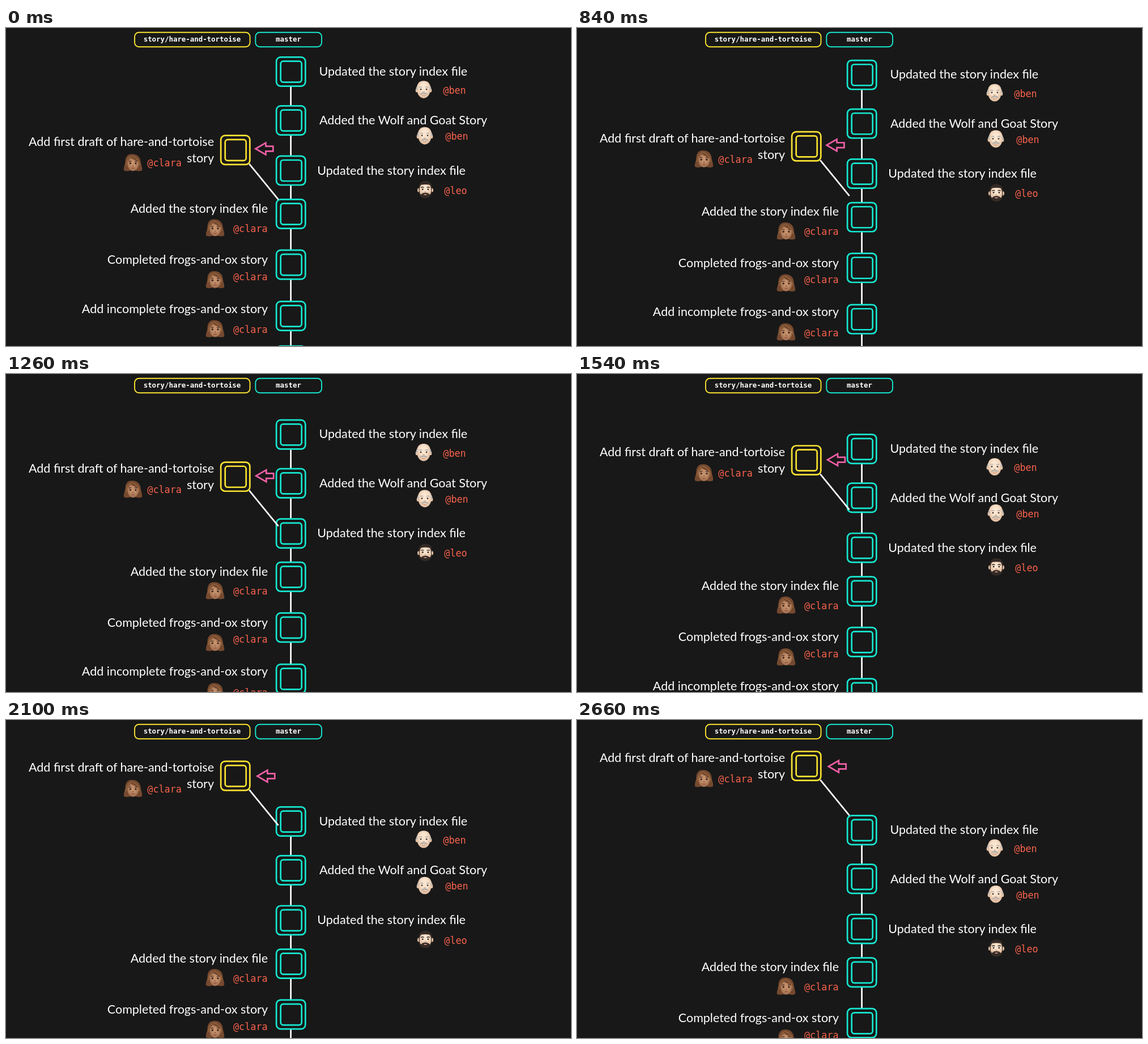
Write an HTML page that moves like this. It is 997 by 561 pixels and loops after 3080 ms.

```html
<!DOCTYPE html>
<html lang="en">
<head>
<meta charset="utf-8">
<title>Commit history</title>
<style>
  html, body { margin: 0; width: 100%; height: 100%; overflow: hidden; background: #181818; }
  svg { display: block; width: 997px; height: 561px; }
  .teal { stroke: #16e7cf; }
  .yellow { stroke: #fae232; }
  .box, .pill, .arrow, .link { fill: none; }
  .box { stroke-width: 2.7; }
  .pill { stroke-width: 1.9; }
  .arrow { stroke: #ef5fa7; stroke-width: 2.7; }
  .link { stroke: #fff; stroke-width: 2.7; }
  .msg { font: 21.5px Lato, sans-serif; fill: #fff; }
  .user { font: 16.8px "DejaVu Sans Mono", monospace; fill: #fa634d; }
  .branch { font: bold 12.4px "DejaVu Sans Mono", monospace; fill: #fff; text-anchor: middle; }
  .end { text-anchor: end; }
</style>
</head>
<body>
<svg viewBox="0 0 997 561">
  <defs>
    <g id="box">
      <rect x="1.4" y="1.4" width="51.2" height="51.2" rx="7.5"/>
      <rect x="9" y="8.6" width="37" height="37" rx="4.5"/>
    </g>

    <radialGradient id="pale" cy=".4">
      <stop offset=".5" stop-color="#fae5d0"/><stop offset="1" stop-color="#e6c3a6"/>
    </radialGradient>
    <radialGradient id="tan" cy=".45">
      <stop offset=".4" stop-color="#c4906b"/><stop offset="1" stop-color="#a37150"/>
    </radialGradient>

    <g id="elder">
      <ellipse cx="-12.3" cy="1.5" rx="2" ry="3.6" fill="#e6c3a6"/>
      <ellipse cx="12.3" cy="1.5" rx="2" ry="3.6" fill="#e6c3a6"/>
      <path d="M0-15.3C8-15.3 12-10 12-2C12 8 7 15.4 0 15.4S-12 8-12-2C-12-10-8-15.3 0-15.3Z" fill="url(#pale)"/>
      <path d="M-11-7Q-14.5-4-12.6 2L-10.6 0ZM11-7Q14.5-4 12.6 2L10.6 0Z" fill="#bcb9b4"/>
      <path d="M-8-3.6Q-5.5-5.4-2.8-3.8M8-3.6Q5.5-5.4 2.8-3.8" fill="none" stroke="#b0aca5" stroke-width="1.5"/>
      <circle cx="-5" cy="-.3" r="1.4" fill="#4b3a30"/>
      <circle cx="5" cy="-.3" r="1.4" fill="#4b3a30"/>
      <path d="M-2 3.6Q0 5 2 3.6" fill="none" stroke="#d0a486" stroke-width="1.4"/>
      <path d="M0 5.4Q4.6 5 7 8.8Q3 9 0 7.8Q-3 9-7 8.8Q-4.6 5 0 5.4Z" fill="#b3b0aa"/>
      <path d="M-3 10.2Q0 11.4 3 10.2" fill="none" stroke="#c58f78" stroke-width="1.1"/>
    </g>

    <g id="beard">
      <ellipse cx="-11.8" cy="1" rx="2.2" ry="3.6" fill="#e6c3a6"/>
      <ellipse cx="11.8" cy="1" rx="2.2" ry="3.6" fill="#e6c3a6"/>
      <path d="M-11.3 0C-13-10 -8-15.3 0-15.3S13-10 11.3 0V5C11 12 6 15.4 0 15.4S-11 12-11.3 5Z" fill="#332a26"/>
      <path d="M-10.3 2Q-10-7-7-8.4Q0-9.6 7-8.4Q10-7 10.3 2Q10 7.6 7.4 8.8Q4.6 5.6 0 5.6T-7.4 8.8Q-10 7.6-10.3 2Z" fill="url(#pale)"/>
      <path d="M-7.8-3.4Q-5-5-2.6-3.4M7.8-3.4Q5-5 2.6-3.4" fill="none" stroke="#332924" stroke-width="1.4"/>
      <circle cx="-4.8" cy="-.3" r="1.4" fill="#33261f"/>
      <circle cx="4.8" cy="-.3" r="1.4" fill="#33261f"/>
      <path d="M-1.8 3.2Q0 4.4 1.8 3.2" fill="none" stroke="#d0a486" stroke-width="1.3"/>
      <path d="M-3.8 8.6Q0 7.6 3.8 8.6Q0 11.4-3.8 8.6Z" fill="#d79c8a"/>
    </g>

    <g id="woman">
      <path d="M-3-15C-10-15-13.4-9-13.6-2C-13.8 5-17.4 9-15.8 14Q-10 16-5 14H5Q10 16 15.8 14C17.4 9 14.2 5 13.6-2C13-10 7-16-3-15Z" fill="#75492f"/>
      <path d="M-4-9C-6-5-9.6-4-9.8 1C-9.8 9-5 14.8 0 14.8S10.4 9 10.4 1C9.6-4 1-4-4-9Z" fill="url(#tan)"/>
      <path d="M-4-11C-9-8-11-4-12.2 5M-3-12C6-10 10.6-5 12.2 5" fill="none" stroke="#98683f" stroke-width="1.5"/>
      <path d="M-7.4-1.8Q-5-3.4-2.6-2M7.6-1.8Q5-3.4 2.8-2" fill="none" stroke="#4b2d20" stroke-width="1.2"/>
      <circle cx="-4.6" cy="1.2" r="1.6" fill="#34211a"/>
      <circle cx="4.9" cy="1.2" r="1.6" fill="#34211a"/>
      <path d="M-1.6 5.4Q.1 6.5 1.8 5.4" fill="none" stroke="#80533a" stroke-width="1.2"/>
      <path d="M-3.6 9.2Q.1 8 3.8 9.2Q.1 12-3.6 9.2Z" fill="#96513f"/>
    </g>
  </defs>

  <g id="trunk"></g>

  <g id="draft">
    <use href="#box" class="box yellow" x="377.7" y="188.3"/>
    <path class="link" d="M429.3 239.8L480.6 302.6"/>
    <text class="msg end" x="367" y="208">Add first draft of hare-and-tortoise</text>
    <text class="msg end" x="367" y="237">story</text>
    <use href="#woman" x="224" y="237.5"/>
    <text class="user" x="249.3" y="244.3">@clara</text>
  </g>

  <path id="arrow" class="arrow" d="M440.4 213L458.4 202.6V208.6H471.3V217.4H458.4V223.4Z"/>

  <rect class="pill yellow" x="227" y="7.8" width="203.5" height="25.4" rx="7.5"/>
  <text class="branch" x="328.5" y="24.3">story/hare-and-tortoise</text>
  <rect class="pill teal" x="440.3" y="7.8" width="116.7" height="25.4" rx="7.5"/>
  <text class="branch" x="498.5" y="24.3">master</text>
</svg>

<script>
  const $ = id => document.getElementById(id);

  // box top, message, its x and baseline, face, its x and y, user, its x and baseline
  const commits = [
    [50, 'Updated the story index file', 552.5, 83.7, 'elder', 737, 108.5, '@ben', 771.3, 116],
    [136, 'Added the Wolf and Goat Story', 553, 170.4, 'elder', 739, 190, '@ben', 775.3, 197.4],
    [224.4, 'Updated the story index file', 549.3, 258.5, 'beard', 740, 285, '@leo', 773.3, 292.6],
    [301, 'Added the story index file', 462, 325.8, 'woman', 369, 352.5, '@clara', 401, 359.6],
    [390.5, 'Completed frogs-and-ox story', 462, 416.3, 'woman', 369, 444, '@clara', 401, 444.7],
    [481, 'Add incomplete frogs-and-ox story', 462, 502.5, 'woman', 369, 530.5, '@clara', 401, 538],
    [559.7]
  ];

  $('trunk').innerHTML = commits.map(([top, msg, mx, my, face, fx, fy, user, ux, uy], i) => {
    const box = `<use href="#box" class="box teal" x="475.7" y="${top}"/>`;
    if (!msg) return box;
    return `<path class="link" d="M502.6 ${top + 53.5}V${commits[i + 1][0] + .5}"/>${box}
      <text class="msg${mx < 500 ? ' end' : ''}" x="${mx}" y="${my}">${msg}</text>
      <use href="#${face}" x="${fx}" y="${fy}"/>
      <text class="user" x="${ux}" y="${uy}">${user}</text>`;
  }).join('');

  const LOOP = 3080, TICK = 70, START = 490, SPAN = 2170;

  // cubic-bezier(.445, 0, .555, 1)
  function ease(x) {
    let lo = 0, hi = 1, s = .5;
    for (let i = 0; i < 24; i++) {
      s = (lo + hi) / 2;
      const bx = 1.335 * s * (1 - s) ** 2 + 1.665 * s * s * (1 - s) + s ** 3;
      if (bx < x) lo = s; else hi = s;
    }
    return s * s * (3 - 2 * s);
  }

  const move = (id, x, y) => $(id).setAttribute('transform', `translate(${x.toFixed(2)} ${y.toFixed(2)})`);

  function draw() {
    const t = Math.floor(performance.now() % LOOP / TICK) * TICK;
    const p = ease(Math.min(1, Math.max(0, (t - START) / SPAN)));
    move('trunk', 0, 117.2 * p);
    move('draft', 0, -134.2 * p);
    move('arrow', 3.4 * p, -131 * p);
    requestAnimationFrame(draw);
  }
  draw();
</script>
</body>
</html>
```
